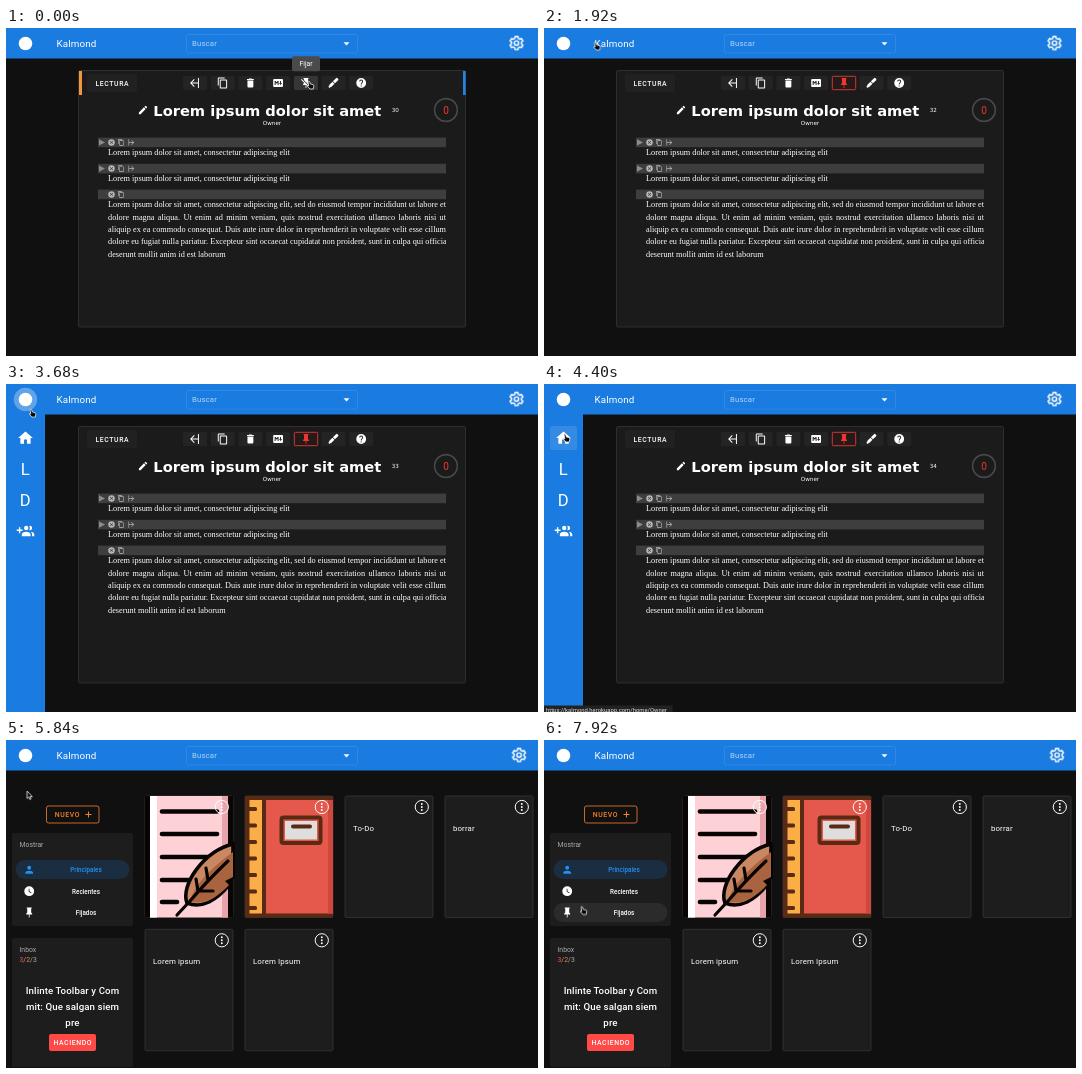
These frames come from a looping animation (532 by 328 pixels, 8 s). An HTML page:

```html
<!DOCTYPE html>
<html lang="es">
<head>
<meta charset="utf-8">
<title>Lectura</title>
<style>
html, body { margin: 0; width: 100%; height: 100%; overflow: hidden; background: #101010; }
svg { display: block; width: 532px; height: 328px; font-family: Roboto, sans-serif; fill: #fff; }
.btn { font-weight: 500; font-size: 6.86px; letter-spacing: .61px; }
.small { font-size: 6.86px; fill: #aaa; }
.row { font-weight: 500; font-size: 6.3px; }
.title { font-size: 7.85px; letter-spacing: .12px; }
.mid { text-anchor: middle; }
.wide { font-family: "DejaVu Sans", sans-serif; font-size: 5.6px; }
.serif { font: 8.25px/12.4px "Liberation Serif", serif; color: #fff; }
.serif p { margin: 0; white-space: nowrap; text-align-last: justify; }
.serif p:last-child { text-align-last: left; }
#drawer { animation: slide 8s infinite; }
#cursor { animation: travel 8s linear infinite; }
@keyframes slide {
  0%, 39.06% { transform: translateX(-40px); animation-timing-function: cubic-bezier(.4, 0, .2, 1); }
  41.56%, 100% { transform: none; }
}
</style>
</head>
<body>
<script>
const LOOP = 8000;
const PAGE_SWITCH = 5520;
const css = [];
let spans = 0;

const ICONS = {
  left: 'M20,22V2H18V11H5.83L11.33,5.5L9.92,4.08L2,12L9.92,19.92L11.33,18.5L5.83,13H18V22H20',
  copy: 'M19,21H8V7H19M19,5H8A2,2 0 0,0 6,7V21A2,2 0 0,0 8,23H19A2,2 0 0,0 21,21V7A2,2 0 0,0 19,5M16,1H4A2,2 0 0,0 2,3V17H4V3H16V1Z',
  trash: 'M19,4H15.5L14.5,3H9.5L8.5,4H5V6H19M6,19A2,2 0 0,0 8,21H16A2,2 0 0,0 18,19V7H6V19Z',
  markdown: 'M2,6Q2,4 4,4H20Q22,4 22,6V18Q22,20 20,20H4Q2,20 2,18ZM5,16H7V11L9,13.5L11,11V16H13V8H11L9,10.5L7,8H5ZM16,8V12H14L17,16L20,12H18V8Z',
  pin: 'M16,12V4H17V2H7V4H8V12L6,14V16H11.2V22H12.8V16H18V14L16,12Z',
  pinOff: 'M2,5.27L3.28,4L20,20.72L18.73,22L12.8,16.07V22H11.2V16H6V14L8,12V11.27L2,5.27M16,12L18,14V16H17.82L8,6.18V4H7V2H17V4H16V12Z',
  marker: 'M18.6,1.5Q17.8,1.5 17.2,2.1L10.75,8.55L14.95,12.74L21.4,6.3Q22.6,4.9 21.4,3.5L20,2.1Q19.4,1.5 18.6,1.5M9.8,9.5L3.2,16L4,16.8L2.4,18.3A2,2 0 0,0 5.2,21.1L6.7,19.6L7.4,20.3L14,13.7Z',
  help: 'M12,2A10,10 0 0,0 12,22A10,10 0 0,0 12,2M11,17H13V19H11ZM8,9A4,4 0 0,1 16,9C16,11.5 13,12 13,15H11C11,11.5 14,11 14,9A2,2 0 0,0 10,9Z',
  pencil: 'M20.7,7Q21.4,6.3 20.7,5.6L18.4,3.3Q17.7,2.6 17,3.3L15.1,5.1L18.9,8.9M3,17.25V21H6.75L17.8,9.9L14.1,6.2L3,17.25Z',
  close: 'M12,2A10,10 0 0,0 12,22A10,10 0 0,0 12,2M17,15.6L15.6,17L12,13.4L8.4,17L7,15.6L10.6,12L7,8.4L8.4,7L12,10.6L15.6,7L17,8.4L13.4,12Z',
  home: 'M10,20V14H14V20H19V12H22L12,3L2,12H5V20H10Z',
  people: 'M19,17V19H7V17S7,13 13,13 19,17 19,17M16,8A3,3 0 1,0 13,11A3,3 0 0,0 16,8M19.2,13A5.6,5.6 0 0,1 21,17V19H24V17S24,13.5 19.2,13M18,5L17.1,5.1A5,5 0 0,1 17.1,10.9L18,11A3,3 0 0,0 18,5M8,10H5V7H3V10H0V12H3V15H5V12H8V10Z',
  person: 'M12,4A4,4 0 0,1 12,12A4,4 0 0,1 12,4M12,14C16.4,14 20,15.8 20,18V20H4V18C4,15.8 7.6,14 12,14Z',
  clock: 'M12,2A10,10 0 0,0 12,22A10,10 0 0,0 12,2M16.2,16.2L11,13V7H12.5V12.2L17,14.9Z',
};

const rect = (x, y, w, h, fill, more = '') =>
  `<rect x="${x}" y="${y}" width="${w}" height="${h}" fill="${fill}" ${more}/>`;
const text = (x, y, label, cls = '', more = '') =>
  `<text x="${x}" y="${y}" class="${cls}" ${more}>${label}</text>`;
const icon = (name, x, y, size = 11.8, fill = '#fff', turn = 0) =>
  `<path d="${ICONS[name]}" fill="${fill}" fill-rule="evenodd" transform="translate(${x} ${y}) rotate(${turn}) scale(${size / 24}) translate(-12 -12)"/>`;
const line = (d, color, width, more = '') =>
  `<path d="${d}" fill="none" stroke="${color}" stroke-width="${width}" ${more}/>`;
const pct = ms => ms / LOOP * 100 + '%';

// Shows the content only inside the given [from, to] spans of the loop.
function during(ranges, content) {
  const name = 'span' + spans++;
  const steps = ranges.map(([from, to]) =>
    `${pct(from)}{opacity:1}` + (to < LOOP ? `${pct(to)}{opacity:0}` : '')).join('');
  css.push(`@keyframes ${name}{0%{opacity:0}${steps}}`);
  return `<g style="animation:${name} 8s step-end infinite">${content}</g>`;
}

function gear(x, y) {
  const points = [];
  for (let i = 0; i < 6; i++) {
    for (const [turn, r] of [[-.34, 6.9], [-.21, 9.2], [.21, 9.2], [.34, 6.9]]) {
      const a = i * Math.PI / 3 + Math.PI / 2 + turn;
      points.push([(r * Math.cos(a)).toFixed(2), (r * Math.sin(a)).toFixed(2)]);
    }
  }
  return `<g transform="translate(${x} ${y}) scale(.73)" fill="none" stroke="#fff" stroke-width="2" stroke-linejoin="round">
    <polygon points="${points.join(' ')}"/><circle r="3"/></g>`;
}

function header() {
  return rect(0, 0, 532, 30.5, '#1a7be0')
    + during([[2160, 3760]], '<circle cx="19.5" cy="15.5" r="11.7" fill="#fff" fill-opacity=".3"/>')
    + '<circle cx="19.5" cy="15.5" r="6.8"/>'
    + text(50.5, 18.6, 'Kalmond', '', 'font-size="9.8" letter-spacing=".12"')
    + rect(180.5, 6.5, 171, 18.5, 'none', 'rx="2" stroke="#3b8fe8" stroke-width=".7"')
    + text(186, 18.2, 'Buscar', 'title', 'fill="#b4d4f6"')
    + '<path d="M337.5,14.3H343.5L340.5,17.4Z"/>'
    + during([[0, PAGE_SWITCH]], gear(510.5, 15))
    + during([[PAGE_SWITCH, LOOP]], gear(513, 15));
}

function toolbar() {
  const names = ['left', 'copy', 'trash', 'markdown', '', 'marker', 'help'];
  const buttons = names.map((name, i) => {
    const x = 189 + i * 27.7;
    return rect(x - 12, 48, 24, 14, '#242424', 'rx="1.5"') + (name ? icon(name, x, 55) : '');
  }).join('');
  return rect(81, 46, 50, 18, '#212121', 'rx="2"') + text(89.5, 57.5, 'LECTURA', 'btn') + buttons
    + during([[0, 320]], rect(288, 48, 24, 14, '#363636', 'rx="1.5"') + icon('pinOff', 300, 55))
    + during([[320, PAGE_SWITCH]], rect(288.3, 48.3, 23.4, 13.4, '#241a1a', 'rx="1" stroke="#e53935" stroke-width=".9"')
      + icon('pin', 300, 55, 11.8, '#f0372f'));
}

function sectionBar(y, foldable) {
  const tint = '#b8b8b8';
  return rect(92, y, 348, 9.6, '#3e3e3e')
    + icon('close', 105.5, y + 4.8, 7.8, tint) + icon('copy', 115, y + 4.8, 7.2, tint)
    + (foldable ? `<path d="M93,${y + 1.6}L99,${y + 4.8}L93,${y + 8}Z" fill="#8c8c8c"/>`
      + icon('left', 125, y + 4.8, 7.6, tint, 180) : '');
}

function reader() {
  const opening = 'Lorem ipsum dolor sit amet, consectetur adipiscing elit';
  const lines = [
    opening + ', sed do eiusmod tempor incididunt ut labore et',
    'dolore magna aliqua. Ut enim ad minim veniam, quis nostrud exercitation ullamco laboris nisi ut',
    'aliquip ex ea commodo consequat. Duis aute irure dolor in reprehenderit in voluptate velit esse cillum',
    'dolore eu fugiat nulla pariatur. Excepteur sint occaecat cupidatat non proident, sunt in culpa qui officia',
    'deserunt mollit anim id est laborum',
  ];
  const prose = (y, rows) => `<foreignObject x="102" y="${y}" width="338" height="70">
    <div class="serif">${rows.map(row => `<p>${row}</p>`).join('')}</div></foreignObject>`;
  const ticks = [0, 1000, 1900, 2960, 4080, 5280, PAGE_SWITCH];
  const counter = ticks.slice(0, -1).map((from, i) =>
    during([[from, ticks[i + 1]]], text(385.8, 84, 30 + i, 'wide'))).join('');
  return rect(72.5, 42.5, 387, 256.5, '#1b1b1b', 'rx="1.5" stroke="#373737" stroke-width=".8"')
    + during([[0, 440], [1520, 1680]], rect(73, 43, 3, 24, '#f2963c') + rect(457, 43, 2.7, 24, '#2283e2'))
    + toolbar()
    + icon('pencil', 137, 82, 11)
    + text(147.3, 87.6, 'Lorem ipsum dolor sit amet', 'wide', 'style="font-size:14.66px;font-weight:bold"')
    + text(266, 97.2, 'Owner', 'wide mid') + counter
    + '<circle cx="440" cy="82" r="11.4" fill="none" stroke="#484848" stroke-width="1.6"/>'
    + text(440, 85.6, '0', 'mid', 'style="font-size:10px;fill:#f0372f"')
    + sectionBar(109.6, true) + prose(119.2, [opening])
    + sectionBar(135.8, true) + prose(145.2, [opening])
    + sectionBar(161.6, false) + prose(171.2, lines)
    + during([[0, 360]], rect(286, 28.3, 28, 15, '#4b4b4b', 'rx="2"') + text(300, 38.3, 'Fijar', 'small mid', 'style="fill:#fff"'));
}

function drawer() {
  const letter = (y, s) => text(19.3, y, s, 'mid', 'font-size="16.6"');
  const highlight = alpha => rect(6, 42, 27, 24, '#fff', `rx="2" fill-opacity="${alpha}"`);
  return `<g id="drawer">${rect(-1, 30, 40, 298, '#1a7be0')}
    ${during([[3920, 5040]], highlight(.12))}${during([[5040, PAGE_SWITCH]], highlight(.25))}
    ${icon('home', 19.5, 54, 17.6)}${letter(91, 'L')}${letter(122, 'D')}${icon('people', 19.5, 147, 17.6)}</g>`
    + during([[3920, PAGE_SWITCH]], rect(0, 321.5, 128.5, 7, '#222')
      + text(2, 327.8, 'https://kalmond.herokuapp.com/home/Owner', '', 'font-size="5.9" fill="#ddd"'));
}

function paperArt() {
  const rows = [[71.5, 211], [94, 211], [117, 203], [140, 183], [162, 171]];
  return rect(139, 56, 88, 121.5, '#0a0505') + rect(144, 56, 78, 121.5, '#fdd1d6')
    + rect(144, 56, 7, 121.5, '#fff') + rect(216, 56, 6, 121.5, '#e9a3ad')
    + rows.map(([y, end]) => line(`M156,${y}H${end}`, '#080404', 4.6, 'stroke-linecap="round"')).join('')
    + '<path d="M181,163C174,145 198,111 227,104V137L219,141L223,145C211,160 196,169 181,163Z" fill="#c98762" stroke="#080404" stroke-width="3.6"/>'
    + '<path d="M184,161C190,142 208,126 227,112V137L219,141L223,145C211,158 197,166 184,161Z" fill="#a9643f"/>'
    + line('M171,175L184,161Q201,141 222,121M192,151L190,139M202,140L200,128M193,151L207,151', '#080404', 3.2, 'stroke-linecap="round"');
}

function notebookArt() {
  const brown = '#5a2b14';
  let rings = '';
  for (let y = 67; y < 175; y += 16.5) rings += rect(241, y, 10, 4, brown, 'rx="1.5"');
  return rect(239, 56, 88, 121.5, brown) + rect(243.5, 60, 12.5, 113.5, '#fbae46')
    + rect(260, 60, 67, 113.5, '#e5594d') + rect(322, 60, 5, 113.5, '#cf473f') + rings
    + rect(275.5, 77.5, 39, 25.5, '#e5594d', `rx="2" stroke="${brown}" stroke-width="4"`)
    + rect(279, 81, 32, 18.5, '#dedede') + line('M287,86.5H304', brown, 4, 'stroke-linecap="round"');
}

function card(x, y, title, art = '') {
  const mx = x + 76.8, my = y + 11;
  const dots = [-3, 0, 3].map(d => `<circle cx="${mx}" cy="${my + d}" r=".95"/>`).join('');
  return rect(x, y, 88, 121.5, '#1d1d1d', 'rx="1.5" stroke="#383838" stroke-width=".8"') + art
    + `<circle cx="${mx}" cy="${my}" r="6.6" fill="none" stroke="#fff"/>${dots}` + text(x + 8, y + 35, title, 'title');
}

function home() {
  const row = (y, name, label, color) => icon(name, 23.2, y, 11.8, color) + text(80, y + 2.3, label, 'row mid', `style="fill:${color}"`);
  const pill = (y, fill) => rect(9.5, y - 9.5, 114, 19, fill, 'rx="9.5"');
  const orange = '#f5822f';
  const heading = ['Inlinte Toolbar y Com', 'mit: Que salgan siem', 'pre'];
  return rect(40.5, 66, 52.5, 17, 'none', `rx="2" stroke="${orange}" stroke-width=".8"`)
    + text(48.8, 77, 'NUEVO', 'btn', `fill="${orange}"`) + line('M79.5,74.5H85.5M82.5,71.5V77.5', orange, 1)
    + rect(6, 93, 121, 93, '#1d1d1d', 'rx="2"') + text(13.5, 107, 'Mostrar', 'small')
    + pill(129.5, '#1b2d40')
    + during([[7200, 7560]], pill(151, '#2b2b2b')) + during([[7560, LOOP]], pill(172.5, '#2b2b2b'))
    + row(129.7, 'person', 'Principales', '#2490f0') + row(151.2, 'clock', 'Recientes', '#fff') + row(172.5, 'pin', 'Fijados', '#fff')
    + rect(6, 198, 121, 129, '#1d1d1d', 'rx="2"') + text(13.5, 212, 'Inbox', 'small')
    + text(13.5, 221.7, `<tspan fill="#f0524c">3</tspan>/<tspan fill="${orange}">2</tspan>/3`, 'small')
    + heading.map((s, i) => text(66.5, 254.4 + i * 15.8, s, 'mid', 'font-size="9.7" font-weight="500" letter-spacing=".1"')).join('')
    + rect(43, 294, 47, 17, '#ff4a48', 'rx="2"') + text(66.8, 305, 'HACIENDO', 'btn mid')
    + card(139, 56, '', paperArt()) + card(239, 56, '', notebookArt())
    + card(339, 56, 'To-Do') + card(439, 56, 'borrar')
    + card(139, 189.3, 'Lorem ipsum') + card(239, 189.3, 'Lorem Ipsum');
}

function cursor() {
  const path = [
    [0, 302, 53], [320, 302, 53], [480, 250, 32], [720, 22, 14], [880, 60, 17], [960, 74, 20],
    [1120, 95, 27], [1360, 95, 27], [1600, 180, 50], [1760, 110, 30], [1920, 50.5, 14], [2160, 25, 17],
    [3600, 25, 18], [3920, 21, 46], [4400, 20, 50], [5200, 21, 49], [5840, 21, 51], [6300, 60, 100],
    [6900, 50, 130], [7400, 50, 150], [7840, 37, 166.5], [8000, 37, 166.5],
  ];
  css.push(`@keyframes travel{${path.map(([t, x, y]) => `${pct(t)}{transform:translate(${x}px,${y}px)}`).join('')}}`);
  const shape = d => `<path d="${d}" fill="#080808" stroke="#fff" stroke-width=".75" stroke-linejoin="round"/>`;
  const hand = shape('M0,.6Q.8,-.4 1.6,.6L2.4,3L5,3.6Q6,4 5.8,5.4L5.2,8H2L-.8,5Q-.6,4 .8,4.8Z');
  const arrow = shape('M0,0V7.4L1.7,5.9L2.8,8.4L4,7.9L2.9,5.5H5.2Z');
  const pointing = [[0, 440], [1880, 3760], [3920, 5040], [7000, LOOP]];
  const plain = [[440, 1880], [3760, 3920], [5040, 7000]];
  return `<g id="cursor">${during(pointing, hand)}${during(plain, arrow)}</g>`;
}

const scene = header()
  + during([[0, PAGE_SWITCH]], reader() + drawer())
  + during([[PAGE_SWITCH, LOOP]], home())
  + cursor();
document.head.insertAdjacentHTML('beforeend', `<style>${css.join('\n')}</style>`);
document.body.insertAdjacentHTML('beforeend', `<svg viewBox="0 0 532 328">${scene}</svg>`);
</script>
</body>
</html>
```
